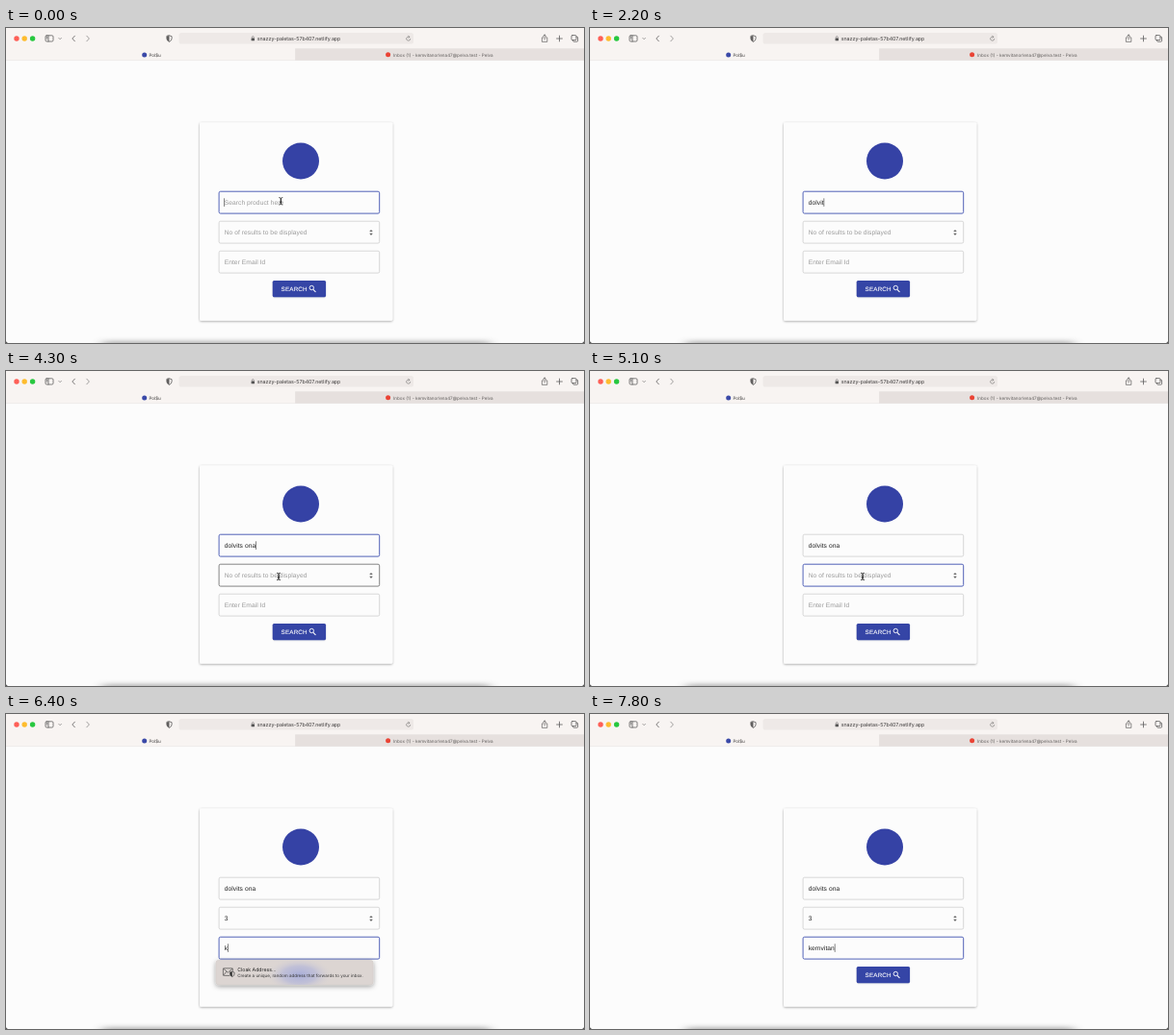
An HTML page for the animation above (8000 ms loop, 600 by 328 pixels).

```html
<!DOCTYPE html>
<html lang="en">
<head>
<meta charset="utf-8">
<title>Product search form</title>
<style>
  html, body { margin: 0; width: 100%; height: 100%; overflow: hidden; background: #fcfcfc; }
  svg { display: block; width: 100%; height: 100%; }
  text { white-space: pre; text-rendering: geometricPrecision; }
  .ui { font-family: Inter, "Noto Sans", sans-serif; fill: #3c3a3a; }
  .form { font: 6.67px "Liberation Sans", Arial, sans-serif; letter-spacing: .00938em; }
  .icon { fill: none; stroke: #5f5d5d; stroke-width: .8; stroke-linecap: round; stroke-linejoin: round; }
</style>
</head>
<body>
<svg viewBox="0 0 600 328" preserveAspectRatio="none">
  <defs>
    <filter id="soft" x="-20%" y="-400%" width="140%" height="900%"><feGaussianBlur stdDeviation="6 2.4"/></filter>
    <filter id="lift" x="-10%" y="-10%" width="120%" height="120%">
      <feDropShadow dx="0" dy=".8" stdDeviation="1" flood-opacity=".36"/>
    </filter>
    <filter id="low" x="-10%" y="-20%" width="120%" height="150%">
      <feDropShadow dx="0" dy=".5" stdDeviation=".7" flood-opacity=".2"/>
    </filter>
    <filter id="float" x="-10%" y="-40%" width="120%" height="200%">
      <feDropShadow dx="0" dy="1.6" stdDeviation="2.4" flood-opacity=".38"/>
    </filter>
    <radialGradient id="glow">
      <stop offset="0" stop-color="#a3aada" stop-opacity=".9"/>
      <stop offset=".5" stop-color="#b2b5d9" stop-opacity=".65"/>
      <stop offset="1" stop-color="#dcd5d2" stop-opacity="0"/>
    </radialGradient>
    <clipPath id="sheet"><rect x="217.8" y="256.2" width="163.4" height="25.8" rx="3"/></clipPath>
    <path id="beam" d="M-1.6 -3.7Q0 -3.7 0 -2.6V2.6Q0 3.7 -1.6 3.7M1.6 -3.7Q0 -3.7 0 -2.6V2.6Q0 3.7 1.6 3.7M-.9 .9H.9"/>
  </defs>

  <!-- page -->
  <rect width="600" height="328" fill="#fcfcfc"/>
  <rect x="100" y="326.5" width="402" height="6" fill="#555" opacity=".5" filter="url(#soft)"/>

  <!-- browser bar -->
  <rect width="600" height="33.6" fill="#f8f4f2"/>
  <rect x="300.5" y="21.6" width="299.5" height="12" fill="#e6e0de"/>
  <path d="M300.5 21.6V33.6M300.5 21.6H600M0 33.6H600" stroke="#dfd9d7" stroke-width=".4"/>
  <circle cx="11" cy="11" r="2.7" fill="#fe5f57"/>
  <circle cx="19.2" cy="11" r="2.7" fill="#febc2e"/>
  <circle cx="27.6" cy="11" r="2.7" fill="#28c840"/>
  <g class="icon">
    <rect x="41" y="7.8" width="8" height="6.2" rx="1.2"/>
    <path d="M44 7.8V14M42.2 9.6H43M42.2 11H43"/>
    <path d="M54.8 10.4L56.1 11.7L57.4 10.4" stroke-width=".6"/>
    <path d="M71.4 8.2L68.8 11L71.4 13.8"/>
    <path d="M83.8 8.2L86.4 11L83.8 13.8" stroke="#8b8989"/>
    <path d="M169.5 7.8L172.1 8.7V11Q172.1 13.2 169.5 14.4Q166.9 13.2 166.9 11V8.7Z"/>
    <path d="M169.5 7.8V14.4Q166.9 13.2 166.9 11V8.7Z" fill="#5f5d5d" stroke="none"/>
  </g>
  <rect x="179.5" y="5" width="243.5" height="11.6" rx="2.6" fill="#eee9e7"/>
  <rect x="254.6" y="10.4" width="3.4" height="2.9" rx=".5" fill="#555"/>
  <path class="icon" d="M255.3 10.5V9.6A1 1 0 0 1 257.3 9.6V10.5" style="stroke-width:.5"/>
  <text class="ui" x="260.7" y="13" font-size="5.3">snazzy-paletas-57b407.netlify.app</text>
  <g class="icon">
    <path d="M418.8 9.3A2.1 2.1 0 1 0 419.8 11.4M417.7 8.1L418.9 9.3L417.7 10.4" style="stroke-width:.5"/>
    <path d="M557.7 9.9H556.4V14.4H561.8V9.9H560.5M559.1 12V7M557.6 8.4L559.1 7L560.6 8.4" style="stroke-width:.7"/>
    <path d="M574.5 8.1V13.9M571.6 11H577.4"/>
    <rect x="587" y="7.6" width="5" height="5" rx="1"/>
    <path d="M592 9.2H592.8Q593.6 9.2 593.6 10V13.4Q593.6 14.2 592.8 14.2H589.4Q588.6 14.2 588.6 13.4V12.6"/>
  </g>
  <circle cx="143.7" cy="28" r="2.5" fill="#3a49a8"/>
  <text class="ui" x="148.4" y="29.7" font-size="4.6">Pol$u</text>
  <circle cx="396.6" cy="27.8" r="2.5" fill="#ea4335"/>
  <text class="ui" x="402" y="29.5" font-size="4.58" style="fill:#615e5d">Inbox (1) - kemvitanorlena47@pelva.test - Pelva</text>

  <!-- card -->
  <rect x="201" y="98.3" width="200.3" height="206.4" rx="1.6" fill="#fcfcfc" filter="url(#lift)"/>
  <circle cx="306" cy="138.5" r="19" fill="#3542a5"/>
  <g id="fields"></g>
  <path d="M377.2 212.1L379 209.9L380.8 212.1ZM377.2 213.7L379 215.9L380.8 213.7Z" fill="#666"/>
  <rect x="276.7" y="263" width="55.4" height="17.2" rx="1.6" fill="#3645a6" filter="url(#low)"/>
  <text x="285.6" y="273.9" fill="#fff" stroke="#fff" stroke-width=".12" class="form" style="font-size:6.25px;letter-spacing:.0286em">SEARCH</text>
  <path d="M319 272.3L321.5 275" stroke="#fff" stroke-width="1.1"/>
  <circle cx="317.3" cy="270.5" r="2.2" fill="none" stroke="#fff" stroke-width=".9"/>

  <rect id="caret" width=".55" height="8.6" fill="#222"/>

  <!-- mail suggestion -->
  <g id="popup">
    <rect x="217.8" y="256.2" width="163.4" height="25.8" rx="3" fill="#dcd5d2" stroke="#c6bfbc" stroke-width=".3" filter="url(#float)"/>
    <ellipse cx="304.5" cy="271.5" rx="35" ry="18" fill="url(#glow)" clip-path="url(#sheet)"/>
    <g class="icon" style="stroke:#333;stroke-width:.6">
      <path d="M232 272.4H226.4Q225.4 272.4 225.4 271.4V265.8Q225.4 264.8 226.4 264.8H234.4Q235.4 264.8 235.4 265.8V267.4M225.8 265.2L230.4 269.2L235 265.2M225.8 272L228.8 268.4"/>
      <path d="M234.8 268.2L237 269V271Q237 272.6 234.8 273.6Q232.6 272.6 232.6 271V269Z" fill="#dcd5d2"/>
      <path d="M234.8 268.2V273.6Q232.6 272.6 232.6 271V269Z" fill="#333" stroke="none"/>
    </g>
    <text class="ui" x="240.2" y="267.7" font-size="5.2" style="fill:#222">Cloak Address...</text>
    <text class="ui" x="240.2" y="274.4" font-size="4.5" style="fill:#333">Create a unique, random address that forwards to your inbox.</text>
  </g>

  <g id="mouse" fill="none" stroke-linecap="round">
    <use href="#beam" stroke="#fff" stroke-width="1.6"/>
    <use href="#beam" stroke="#111" stroke-width=".75"/>
  </g>
  <path d="M0 325.5V328H2.5Q0 328 0 325.5ZM600 325.5V328H597.5Q600 328 600 325.5Z" fill="#222"/>
</svg>
<script>
const LOOP = 8000, STEP = 100, BLINK = 500, LEFT = 226.7;
const $ = id => document.getElementById(id);

const fields = [
  { y: 170, hint: 'Search product here', value: 'dolvits ona', focus: -100,
    keys: [1200, 1400, 1600, 1800, 1900, 2100, 2300, 2500, 2700, 2900, 3100] },
  { y: 201, hint: 'No of results to be displayed', value: '3', focus: 4500, keys: [5200] },
  { y: 232, hint: 'Enter Email Id', value: 'kemvitan', focus: 5900,
    keys: [6400, 6600, 6800, 7000, 7100, 7300, 7600, 7800] }
];

// pointer stops: time, x, y
const path = [[0, 285.3, 180.3], [3800, 285.3, 180.3], [4300, 283, 214], [5400, 283, 214], [5800, 271, 245], [LOOP, 271, 245]];
const shown = [[0, 1200], [3900, 5200], [5400, 6400]];

const clamp = v => Math.min(1, Math.max(0, v));
const ease = v => v * v * (3 - 2 * v);

function set(el, attrs) {
  for (const k in attrs) el.setAttribute(k, attrs[k]);
  return el;
}

function add(tag, attrs) {
  const el = document.createElementNS('http://www.w3.org/2000/svg', tag);
  return $('fields').appendChild(set(el, attrs));
}

for (const f of fields) {
  f.box = add('rect', { x: 221.1, y: f.y + .2, width: 166.6, height: 22.9, rx: 1.6, fill: 'none' });
  f.label = add('text', { class: 'form', x: LEFT, y: f.y + 13.9 });
}

function pointer(t) {
  const i = path.findIndex((p, n) => n && t < p[0]);
  const [t0, x0, y0] = path[i - 1], [t1, x1, y1] = path[i];
  const k = ease(clamp((t - t0) / (t1 - t0)));
  return [x0 + (x1 - x0) * k, y0 + (y1 - y0) * k];
}

function draw(t) {
  const [mx, my] = pointer(t);
  const visible = shown.some(([from, to]) => t >= from && t < to);
  const active = fields.filter(f => t >= f.focus).pop();
  set($('mouse'), { transform: `translate(${mx} ${my})`, opacity: visible ? 1 : 0 });

  for (const f of fields) {
    const past = f.keys.filter(k => k <= t);
    const typed = past.length;
    const hover = visible && my > f.y && my < f.y + 23;
    const [color, width] = f === active ? ['#3f51b0', .9] : hover ? ['#444', .65] : ['#c3c3c3', .65];
    set(f.box, { stroke: color, 'stroke-width': width });
    f.label.textContent = typed ? f.value.slice(0, typed) : f.hint;
    set(f.label, { fill: typed ? '#222' : '#9a9a9a' });

    if (f === active) {
      const since = t - Math.max(f.focus, ...past);
      set($('caret'), {
        x: LEFT + (typed ? f.label.getComputedTextLength() : -.4),
        y: f.y + 7.3,
        opacity: since % (2 * BLINK) < BLINK ? 1 : 0
      });
    }
  }

  const fade = Math.min(clamp((t - 5900) / 200), clamp((6800 - t) / 300));
  set($('popup'), { opacity: fade });
}

const start = performance.now();
function tick() {
  const t = (performance.now() - start) % LOOP;
  draw(Math.floor(t / STEP) * STEP);
  requestAnimationFrame(tick);
}
tick();
</script>
</body>
</html>
```
